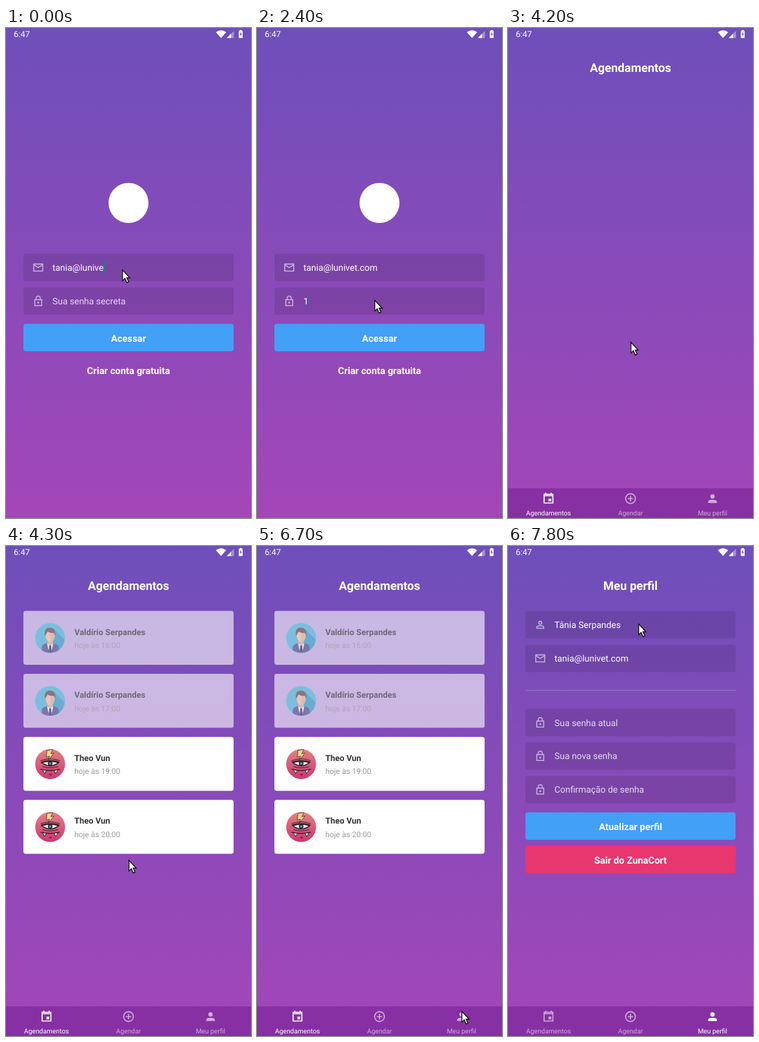
These frames come from a looping animation (380x759 px, 8000 ms). An HTML page:

```html
<!DOCTYPE html>
<html lang="pt-BR">
<head>
<meta charset="utf-8">
<title>Agendamentos</title>
<style>
  html, body { margin: 0; width: 100%; height: 100%; overflow: hidden; background: #6e4fba; }
  svg { display: block; width: 100%; height: 100%; }
  text { font-family: Roboto, sans-serif; text-rendering: geometricPrecision; fill: #fff; }
</style>
</head>
<body>
<svg id="stage" viewBox="0 0 380 759"></svg>
<script>
const LOOP = 8000, STEP = 100;
const EMAIL = 'tania@lunivet.com';

// Icons on a 24-unit grid, drawn with 2-unit strokes.
const ICONS = {
  mail: 'M3 5H21V19H3ZM3 6.7L12 12.2L21 6.7',
  lock: 'M5 9H19V21H5ZM8 9V6a4 4 0 0 1 8 0V9M12 14a1 1 0 0 1 0 2a1 1 0 0 1 0-2',
  user: 'M12 5a3 3 0 0 1 0 6a3 3 0 0 1 0-6M5 19v-2c0-4 14-4 14 0v2z',
  event: 'M4 4H20V20H4ZM4 6.5H20M7 1V4M17 1V4M13 13h3v3h-3z',
  add: 'M12 3a9 9 0 0 1 0 18a9 9 0 0 1 0-18M12 7V17M7 12H17',
  person: 'M12 5a3 3 0 0 1 0 6a3 3 0 0 1 0-6M5 19v-1c0-4 14-4 14 0v1z'
};

const text = (x, y, size, content, extra = '') =>
  `<text x="${x}" y="${y}" font-size="${size}" ${extra}>${content}</text>`;

const centered = (y, size, content) =>
  text(190, y, size, content, 'text-anchor="middle" font-weight="700"');

const icon = (name, cx, cy, size, opacity) => {
  const fill = name === 'person' ? '#fff' : 'none';
  return `<path d="${ICONS[name]}" fill="${fill}" stroke="#fff" stroke-width="2" opacity="${opacity}"
    transform="translate(${cx} ${cy}) scale(${size / 24}) translate(-12 -12)"/>`;
};

const box = (y, height, fill, extra = '') =>
  `<rect x="27" y="${y}" width="326" height="${height}" rx="3.7" fill="${fill}" ${extra}/>`;

const input = (y, iconName, content, id = '', opacity = 1) =>
  box(y, 42.5, '#000', 'opacity=".1"') + icon(iconName, 50, y + 21.2, 18.5, .6) +
  text(72, y + 26.2, 13.9, content, `id="${id}" opacity="${opacity}"`);

const button = (y, fill, label) => box(y, 42.5, fill) + centered(y + 27.3, 14.8, label);

const man = `
  <circle r="23.2" fill="#48c3dc"/>
  <path d="M6-14L22 2A23 23 0 0 1 10 21L-4 14Z" fill="#2ba5c6"/>
  <path d="M-13 19V14Q-12 9-4 8H4Q12 9 13 14V19A23.2 23.2 0 0 1-13 19" fill="#474d86"/>
  <path d="M-4 3H4V9L0 14L-4 9Z" fill="#eab98a"/>
  <path d="M-5 8L0 12L5 8L3 17L0 22L-3 17Z" fill="#fff"/>
  <path d="M-1.5 11.5H1.5L2 20L0 23L-2 20Z" fill="#2c3155"/>
  <ellipse cy="-3" rx="7" ry="9" fill="#fbd3a4"/>
  <path d="M0-12A7 9 0 0 1 0 6Z" fill="#eebf8f"/>
  <path d="M-8-3Q-10-15-2-16Q9-17 8-3L6-8Q0-7-4-10Z" fill="#63493f"/>`;

const monster = `
  <circle r="23.2" fill="url(#pink)"/>
  <path d="M-5-21L4-22.5L1-16L6-17L-3-6L-1-12L-6-11Z" fill="#f5d58b" stroke="#4b2931" stroke-width=".8"/>
  <g stroke="#32222b" fill="none" stroke-width="1.5">
    <path d="M-15-5Q0-11 15-5M-12 4Q0 8 12 4" stroke-width="1"/>
    <path d="M-13-2Q0-7 13-2Q0 8-13-2Z" fill="#f4eee8"/>
    <circle cy="-.8" r="2.8" fill="#3b9aa5"/>
    <path d="M-14-2.5Q0-7 14-2.5" stroke-width="2.4"/>
    <path d="M-15 8Q0 12 15 8"/>
    <path d="M-12 9L-6 9.8L-8.5 15ZM12 9L6 9.8L8.5 15Z" fill="#fff" stroke-width="1"/>
  </g>
  <path d="M-2 16Q1 14 3 16Q1 20-2 16" fill="#7d2148"/>`;

// Past appointments fade each child separately.
const card = (index, avatar, name, hour) => {
  const y = 100.5 + index * 97.6;
  const fade = `opacity="${index < 2 ? .6 : 1}"`;
  return box(y, 83.5, '#fff', fade) +
    `<g transform="translate(68.5 ${y + 42})" ${fade}>${avatar}</g>` +
    text(106, y + 37, 12.95, name, `font-weight="700" style="fill:#333" ${fade}`) +
    text(106, y + 57.5, 12.02, `hoje às ${hour}:00`, `style="fill:#999" ${fade}`);
};

const tabs = active => '<rect y="713" width="380" height="46" fill="#8730a3"/>' +
  [['event', 'Agendamentos'], ['add', 'Agendar'], ['person', 'Meu perfil']].map(([name, label], i) => {
    const x = 62.8 + i * 127.2, opacity = i === active ? 1 : .6;
    return icon(name, x, 729, 20.3, opacity) +
      text(x, 755, 10.3, label, `text-anchor="middle" opacity="${opacity}"`);
  }).join('');

const stage = document.getElementById('stage');
stage.innerHTML = `
  <defs>
    <linearGradient id="sky" x2="0" y2="1"><stop stop-color="#6e4fba"/><stop offset="1" stop-color="#a346b8"/></linearGradient>
    <linearGradient id="pink" x2="0" y2="1"><stop stop-color="#e28383"/><stop offset="1" stop-color="#ce3672"/></linearGradient>
  </defs>
  <rect width="380" height="759" fill="url(#sky)"/>

  ${text(12, 14.3, 13, '6:47')}
  <g fill="#fff">
    <path d="M325.5 6.5Q333.5 .5 341.5 6.5L333.5 15.5Z"/>
    <path d="M353.5 4.5V15.5H342.5Z" opacity=".4"/>
    <path d="M349 9V15.5H342.5Z"/>
    <path d="M361 4.5H362.5V3H365.5V4.5H367V15.5H361Z"/>
    <path d="M364.6 6L362.2 10H363.7V13L366 9H364.6Z" fill="#6e4fba"/>
  </g>

  <g id="login">
    <circle cx="190" cy="271" r="31" fill="#fff"/>
    ${input(349.8, 'mail', '', 'email')}
    ${input(401.8, 'lock', '', 'password')}
    <rect id="caret" width="1.8" height="19" fill="#16857f"/>
    <g id="access">${button(458.2, '#42a0f7', 'Acessar')}</g>
    ${centered(535.5, 14.8, 'Criar conta gratuita')}
  </g>

  <g id="schedule">
    ${centered(68, 18.5, 'Agendamentos')}
    <g id="cards">
      ${card(0, man, 'Valdírio Serpandes', 16)}
      ${card(1, man, 'Valdírio Serpandes', 17)}
      ${card(2, monster, 'Theo Vun', 19)}
      ${card(3, monster, 'Theo Vun', 20)}
    </g>
    ${tabs(0)}
  </g>

  <g id="profile">
    ${centered(68, 18.5, 'Meu perfil')}
    ${input(100.8, 'user', 'Tânia Serpandes')}
    ${input(152.8, 'mail', EMAIL)}
    <rect x="27" y="223" width="326" height="1" fill="#fff" opacity=".22"/>
    ${input(252.3, 'lock', 'Sua senha atual', '', .8)}
    ${input(304.2, 'lock', 'Sua nova senha', '', .8)}
    ${input(356.2, 'lock', 'Confirmação de senha', '', .8)}
    ${button(412.4, '#42a0f7', 'Atualizar perfil')}
    ${button(464.2, '#e8376f', 'Sair do ZunaCort')}
    ${tabs(2)}
  </g>

  <path id="pointer" d="M.7 .7V17.5L4.5 14L7.4 20.5L10.2 19.2L7.3 13H12Z" fill="#fff" stroke="#111" stroke-width="1.4"/>`;

const el = id => document.getElementById(id);
const [login, schedule, profile, cards, email, password, caret, access, pointer] =
  ['login', 'schedule', 'profile', 'cards', 'email', 'password', 'caret', 'access', 'pointer'].map(el);

// Pointer stops: time, x, y.
const PATH = [
  [0, 180, 374], [1600, 180, 374], [2000, 184, 421], [2300, 184, 421], [2400, 182, 421],
  [3200, 182, 421], [3500, 190, 486], [4700, 190, 486], [4900, 183, 530], [5000, 183, 530],
  [5300, 173, 690], [5500, 188, 738], [5700, 215, 734], [5900, 323, 735], [6000, 297, 728],
  [6200, 317, 735], [6500, 317, 735], [6700, 317, 720], [7300, 317, 720], [7600, 203, 140],
  [7700, 203, 140], [7800, 202, 120], [LOOP, 202, 120]
];
const EMAIL_KEYS = [300, 400, 900, 900, 1000];
const PASSWORD_KEYS = [2400, 2600, 2800, 3200, 3300, 3400];

const pointerAt = t => {
  const i = PATH.findIndex(stop => stop[0] > t);
  const [t0, x0, y0] = PATH[i - 1], [t1, x1, y1] = PATH[i];
  const k = (t - t0) / (t1 - t0);
  return [x0 + (x1 - x0) * k, y0 + (y1 - y0) * k];
};
const typed = (keys, t) => keys.filter(key => key <= t).length;
const show = (node, visible) => node.setAttribute('display', visible ? 'inline' : 'none');

function drawLogin(t) {
  const digits = typed(PASSWORD_KEYS, t);
  email.textContent = EMAIL.slice(0, 12 + typed(EMAIL_KEYS, t));
  password.textContent = digits ? '•'.repeat(digits - 1) + digits : 'Sua senha secreta';
  password.setAttribute('opacity', digits ? 1 : .8);

  const onPassword = t >= 2100;
  const field = onPassword ? password : email;
  const width = onPassword && !digits ? 0 : field.getComputedTextLength();
  caret.setAttribute('x', 72.4 + width);
  caret.setAttribute('y', onPassword ? 413 : 361);

  access.setAttribute('opacity', t < 3900 || t >= 4100 ? 1 : t < 4000 ? .2 : .6);
}

function frame() {
  const t = Math.floor(performance.now() % LOOP / STEP) * STEP;
  show(login, t < 4200);
  show(schedule, t >= 4200 && t < 7300);
  show(cards, t >= 4300);
  show(profile, t >= 7300);
  if (t < 4200) drawLogin(t);
  pointer.setAttribute('transform', `translate(${pointerAt(t)})`);
  requestAnimationFrame(frame);
}
frame();
</script>
</body>
</html>
```
